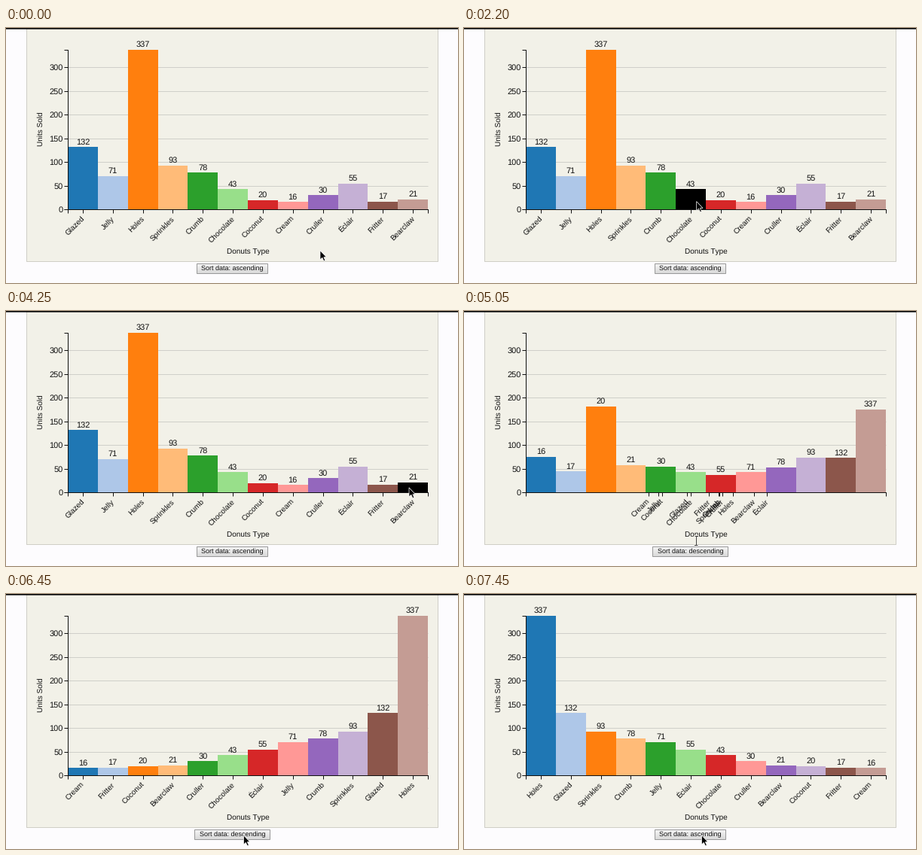
A matplotlib script for the animation above (8 s loop, 600 by 339 pixels).

```python
import numpy as np
import matplotlib.pyplot as plt
from matplotlib.animation import FuncAnimation
from matplotlib.patches import Polygon, Rectangle

W, H, DPI = 600, 339, 100
LOOP, STEP = 8000, 50
LEFT, RIGHT, TOP, BASE = 82, 560, 29, 241.4
UNIT = (BASE - TOP) / 337
BAND = (RIGHT - LEFT) / 12
MIDDLE = 300.3
PX = 72 / DPI

plt.rcParams["font.family"] = "Liberation Sans"
plt.rcParams["text.hinting"] = "none"
plt.rcParams["text.hinting_factor"] = 1

SALES = dict(Glazed=132, Jelly=71, Holes=337, Sprinkles=93, Crumb=78,
             Chocolate=43, Coconut=20, Cream=16, Cruller=30, Éclair=55,
             Fritter=17, Bearclaw=21)
NAMES = list(SALES)
RISING = sorted(NAMES, key=SALES.get)
ORDERS = [NAMES, RISING, RISING[::-1]]
COLORS = plt.get_cmap("tab20").colors
SORT_AT = [4926, 6929]
SORT_MS = 250

# pointer moves: start ms, end ms, then where it arrives
HOME = np.array([417, 294])
MOVES = [(300, 600, 92, 231),        # to the first bar
         (600, 1050, 207, 226.5),    # sweep across the bars
         (1050, 3200, 397, 230.7),
         (3200, 4100, 535, 233),
         (4250, 4400, 311, 318),     # to the button
         (4950, 5050, 308, 305),     # up to the axis title
         (5050, 5400, 299, 297.5),
         (5850, 6150, 315.5, 319)]   # back to the button
ARROW = np.array([(0, 0), (0, 12.2), (2.8, 9.6), (4.9, 14), (6.8, 13.2),
                  (4.8, 8.9), (8.4, 8.9)]) + (0, 1.8)
BEAM = np.array([(-2, -6), (2, -6), (0, -6), (0, 6), (-2, 6), (2, 6)])

fig = plt.figure(figsize=(W / DPI, H / DPI), dpi=DPI, facecolor="#fdfcfe")
ax = fig.add_axes([0, 0, 1, 1])
ax.axis("off")


def line(xs, ys, color="#111111", width=1, z=3):
    return ax.plot(xs, ys, color=color, lw=width * PX, zorder=z,
                   solid_capstyle="butt")[0]


def text(x, y, s, size, ha="center", **kw):
    return ax.text(x, y, s, fontsize=size * PX, color="#111111", zorder=4,
                   ha=ha, va="baseline", rotation_mode="anchor", **kw)


def height_y(value):
    return BASE - value * UNIT


def center(i):
    return LEFT + (i + 0.5) * BAND


# panel, grid and axes
ax.add_patch(Rectangle((27, -5), 546.4, 315, fc="#f2f1e8", ec="#cfcec6", lw=PX, zorder=0))
ax.add_patch(Rectangle((0, 0), W, 1.6, fc="black", lw=0, zorder=1, snap=False))
for v in range(0, 301, 50):
    y = height_y(v)
    if v:
        line([LEFT, RIGHT], [y, y], "#cfcfc9", 1, 1)
    line([LEFT - 5, LEFT], [y, y])
    text(LEFT - 6, y + 3.7, str(v), 10.6, "right")
line([LEFT - 5, LEFT, LEFT, LEFT - 5], [TOP, TOP, BASE, BASE])
line([LEFT, LEFT, RIGHT, RIGHT], [BASE + 5, BASE, BASE, BASE + 5])
text(48.8, 134.5, "Units Sold", 10, rotation=90)
text(321, 299.5, "Donuts Type", 10)

bars, counts, ticks, tags = [], [], [], []
for i, name in enumerate(NAMES):
    bars.append(ax.add_patch(Rectangle((LEFT + i * BAND, BASE), BAND, 0, lw=0, zorder=2)))
    counts.append(text(center(i), 0, "", 10.8))
    ticks.append(line([0, 0], [BASE, BASE + 5]))
    tags.append(text(0, 254, name, 10.2, "right", rotation=45))

# button
face = ax.imshow(np.linspace(0.96, 0.85, 32)[:, None], cmap="gray", vmin=0,
                 vmax=1, aspect="auto", zorder=3)
frame = ax.add_patch(Rectangle((0, 313), 1, 13, fc="none", ec="#999999", lw=PX, zorder=3.5))
caption = text(MIDDLE, 322.5, "", 9.1)

# pointers
arrow = ax.add_patch(Polygon(ARROW, fc="black", ec="white", lw=0.7 * PX, zorder=9))
beams = [line([], [], "#f2f1e8", 2.2, 8), line([], [], "#333333", 0.9, 9)]

ax.set_xlim(0, W)
ax.set_ylim(H, 0)


def ease(p):
    p = min(max(p, 0), 1)
    return 4 * p ** 3 if p < 0.5 else 1 - 4 * (1 - p) ** 3


def pointer(t):
    spot = HOME
    for start, end, x, y in MOVES:
        p = np.clip((t - start) / (end - start), 0, 1)
        spot = spot + p * (np.array([x, y]) - spot)
    return spot


def draw(n):
    t = n * STEP
    stage = sum(t >= s for s in SORT_AT)
    new = ORDERS[stage]
    old = ORDERS[max(stage - 1, 0)]
    k = ease((t - SORT_AT[stage - 1]) / SORT_MS) if stage else 1

    # highlight trails the pointer by one step
    hx, hy = pointer(t - STEP)
    for i, (bar, count) in enumerate(zip(bars, counts)):
        a, b = SALES[old[i]], SALES[new[i]]
        y = height_y(a + (b - a) * k)
        bar.set_y(y)
        bar.set_height(BASE - y)
        over = 0 <= hx - LEFT - i * BAND < BAND and y <= hy <= BASE
        bar.set_facecolor("black" if over else COLORS[i])
        count.set_text(str(b))
        count.set_y(y - 3.7)

    for name, tick, tag in zip(NAMES, ticks, tags):
        a, b = old.index(name), new.index(name)
        x = center(a + (b - a) * k)
        tick.set_xdata([x, x])
        tag.set_x(x + 2.8)

    down = stage == 1
    half = 50 if down else 47
    caption.set_text("Sort data: " + ("descending" if down else "ascending"))
    face.set_extent((MIDDLE - half, MIDDLE + half, 326, 313))
    frame.set_x(MIDDLE - half)
    frame.set_width(2 * half)

    x, y = pointer(t)
    on_text = 293 <= x <= 349 and 289 <= y <= 306
    arrow.set_visible(not on_text)
    arrow.set_xy(ARROW + (x, y))
    for part in beams:
        part.set_visible(on_text)
        part.set_data(*(BEAM + (x, y)).T)
    return []


anim = FuncAnimation(fig, draw, frames=LOOP // STEP, interval=STEP,
                     init_func=lambda: draw(0), repeat=True, repeat_delay=0)
plt.show()
```
